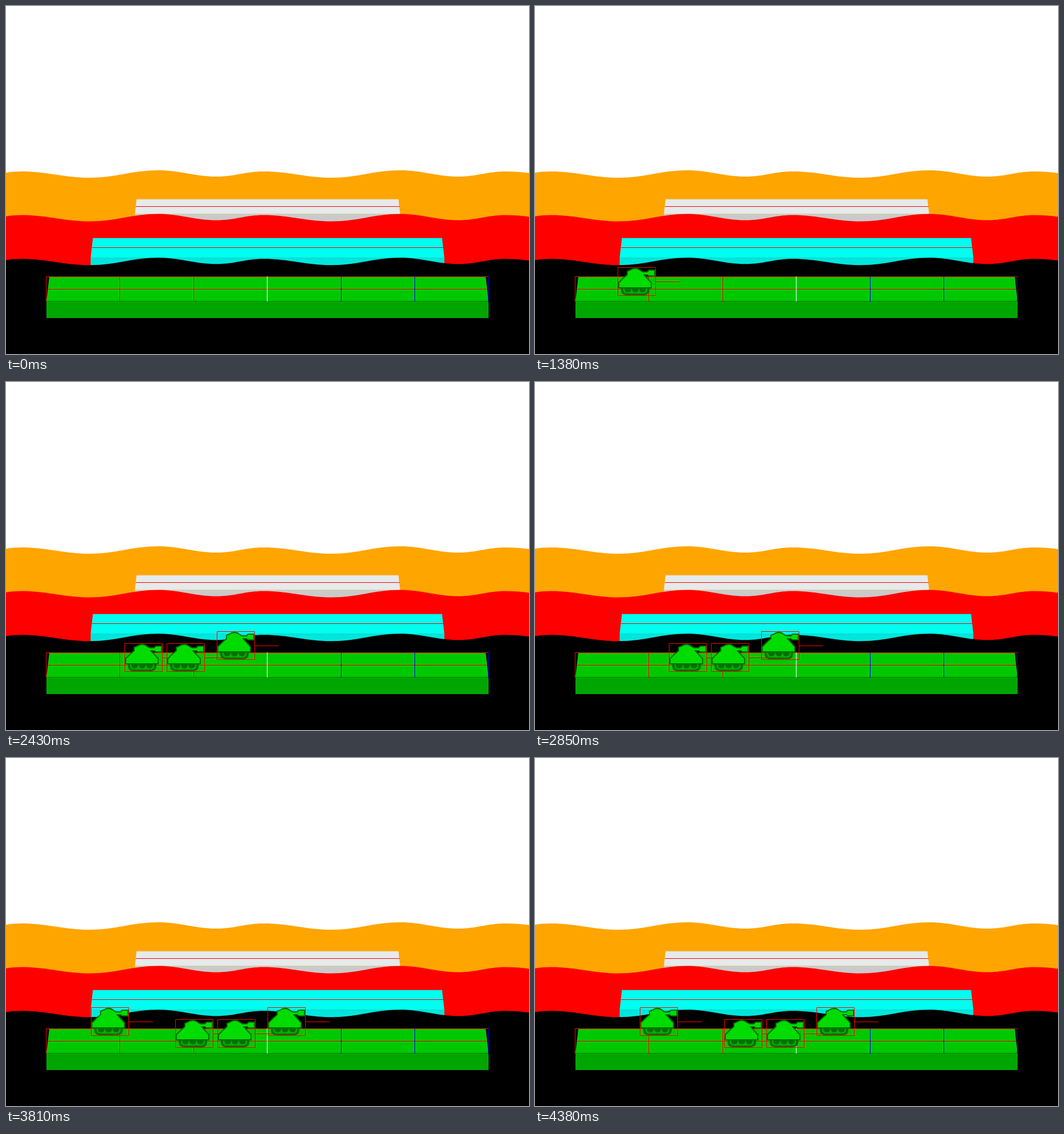
An HTML page with a canvas for the animation above (4.41 s loop, 918x610 px).

```html
<!DOCTYPE html>
<html>
<head>
<meta charset="utf-8">
<style>
html, body { margin: 0; width: 100%; height: 100%; overflow: hidden; background: #fff; }
canvas { display: block; }
</style>
</head>
<body>
<canvas id="stage" width="918" height="610"></canvas>
<script>
const g = document.getElementById('stage').getContext('2d');
const LOOP = 4410, STEP = 30, RED = '#f00', BLUE = '#00f';

// Time and x of the leading tank; the pace drifts slightly.
const pace = [[750, 105], [1800, 172], [2430, 208], [3960, 307.2], [4380, 331.6]];

// dx is the distance from the leading tank.
const tanks = [
  { start: 750, dx: 0, y: 458 },
  { start: 1560, dx: 74, y: 458 },
  { start: 2280, dx: 162, y: 437 },
  { start: 3060, dx: -148, y: 437 }
];

// Turning points of one wave, repeated every PERIOD pixels.
const PERIOD = 424.7;
const wave = [[27, 290], [147, 301], [267, 288], [370, 299]];

function rect(color, x, y, w, h) {
  g.fillStyle = color;
  g.fillRect(x, y, w, h);
}

function hill(color, dy) {
  let px = -200, py = 290;
  g.beginPath();
  g.moveTo(px, py + dy);
  for (let start = -PERIOD; start < 918; start += PERIOD) {
    for (const [wx, y] of wave) {
      const x = start + wx, c = (x - px) * .38;
      if (x < -150) continue;
      g.bezierCurveTo(px + c, py + dy, x - c, y + dy, x, y + dy);
      px = x;
      py = y;
    }
  }
  g.lineTo(px, 610);
  g.lineTo(-200, 610);
  g.fillStyle = color;
  g.fill();
}

// A platform shrinks with distance around the stage centre.
function lane(top, front, scale, mid) {
  const half = 388 * scale, h = 43 * scale, inset = 5 * scale;
  const left = 459 - half, y = mid - h / 2;
  g.beginPath();
  g.moveTo(left + inset, y);
  g.lineTo(459 + half - inset, y);
  g.lineTo(459 + half, y + h);
  g.lineTo(left, y + h);
  g.fillStyle = top;
  g.fill();
  rect(front, left, y + h, half * 2, 29.4 * scale);
  rect(RED, Math.round(left + inset / 2), Math.floor(mid), Math.round(half * 2 - inset), 1);
}

function scene() {
  rect('#fff', 0, 0, 918, 610);
  hill('#ffa500', 0);
  lane('#e5eaea', '#cacaca', .6, 351.7);
  hill(RED, 76.5);
  lane('#00fff0', '#00e6dc', .8, 423.9);
  hill('#000', 153.3);
  lane('#00c800', '#00a600', 1, 496.1);
  rect(RED, 70, 474, 777, 1);
  for (let i = 0; i < 7; i++)
    rect(i < 3 ? RED : i > 3 ? BLUE : '#fff', Math.round(70 + i * 129.4), 474, 1, 44);
}

const hull = new Path2D('M17 13V7L22 5Q26 2 31 2Q36 2 39 5L44 8H52L55 5H65V15H55L52 13H46L50 17L59 27V36H2V27L10 19Z');
const treads = new Path2D('M6 36H56V41Q55 49 46 49H16Q7 49 6 41Z');
const belt = new Path2D('M10 37H52V41Q51 46 45 46H17Q11 46 10 41Z');

function tank(x, y) {
  rect(RED, x + 66, y + 25, 43, 1);
  g.save();
  g.translate(x, y);
  g.fillStyle = '#007000';
  g.fill(treads);
  g.fillStyle = '#00b000';
  g.fill(belt);
  g.fillStyle = '#007000';
  for (let cx = 18; cx < 50; cx += 13) {
    g.beginPath();
    g.arc(cx, 38, 6, 0, 7);
    g.fill();
  }
  g.fillStyle = '#00dc00';
  g.fill(hull);
  g.strokeStyle = '#006e00';
  g.lineWidth = 2;
  g.lineJoin = 'round';
  g.stroke(hull);
  g.strokeStyle = RED;
  g.lineWidth = 1;
  g.strokeRect(.5, .5, 66, 49);
  g.restore();
}

function leadX(t) {
  const i = Math.max(1, pace.findIndex(p => p[0] >= t));
  const [t0, x0] = pace[i - 1], [t1, x1] = pace[i];
  return x0 + (x1 - x0) * (t - t0) / (t1 - t0);
}

function draw(now) {
  const t = Math.floor(now % LOOP / STEP) * STEP;
  scene();
  for (const { start, dx, y } of tanks)
    if (t >= start) tank(Math.round(leadX(t) + dx), y);
}

const begin = performance.now();
function tick() {
  draw(performance.now() - begin);
  requestAnimationFrame(tick);
}
tick();
</script>
</body>
</html>
```
